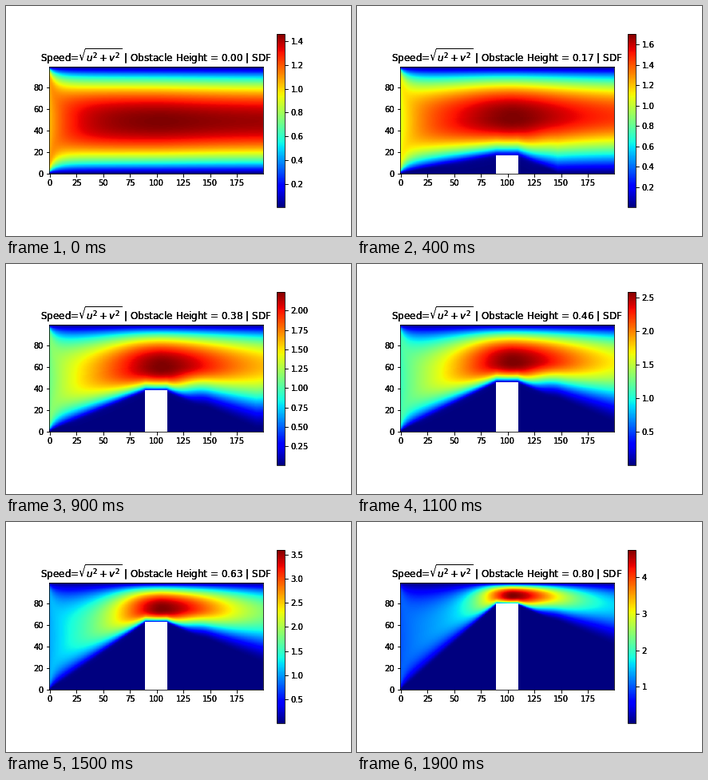
These frames come from a looping animation (432x288 px, 2000 ms). A matplotlib script:

```python
import numpy as np
import matplotlib.pyplot as plt
from matplotlib.animation import FuncAnimation

FRAMES = 20
LEFT, RIGHT, PEAK = 0.9, 1.1, 1.05   # obstacle sides, place of the top speed
heights = np.linspace(0, 0.8, FRAMES)

# peak speed by obstacle height
knots = [0, 0.168, 0.253, 0.379, 0.463, 0.632, 0.8]
peaks = [1.464, 1.705, 1.87, 2.245, 2.588, 3.607, 4.75]
vmax = 1 / np.interp(heights, knots, 1 / np.array(peaks))

xs, ys = np.linspace(0, 2, 200), np.linspace(0, 1, 100)
x, y = np.meshgrid(xs, ys)


def smooth(t):
    t = np.clip(t, 0, 1)
    return t * t * (3 - 2 * t)


def core_speed(h, top):
    """Speed along the middle of the jet."""
    base = 1.42 - 0.42 * np.exp(-x / 0.25)
    up = 0.5 * (1 - h ** 3)
    down = (0.45 + 0.5 * h) * (1 - h ** 3)
    reach = np.abs(x - PEAK) / np.where(x < PEAK, up, down)
    return base + (top - base) * np.exp(-0.693 * reach ** 1.7)


def speed(h, top):
    # middle line of the jet and upper edge of the slow wedges below it
    crest = 0.49 + 0.2 * h + 0.37 * h * h
    mid = 0.49 + (crest - 0.49) * smooth(x / LEFT)
    mid = mid - 0.25 * h ** 4 * np.clip(x - PEAK, 0, 1) ** 2
    edge = np.where(x < LEFT, h * x / LEFT,
                    h - 0.45 * np.clip(x - RIGHT, 0, 1))
    edge = np.maximum(edge, 0)

    power = 2 + 0.2 / (x + 0.01)
    above = np.clip((y - mid) / (1 - mid), 0, 1)
    below = np.clip((mid - y) / (mid - edge), 0, None)

    # flat-topped over the obstacle, bell-shaped in the wake
    blunt = 0.7 * min(1, 3 * h) * np.exp(-((x - 1) / 0.4) ** 2)
    flat = 1 - below ** np.minimum(power + blunt, 25)
    soft = 0.12 * np.clip(edge / 0.1, 0, 1)
    flat = (flat + np.hypot(flat, soft)) / 2
    bell = np.cos(np.pi / 2 * np.minimum(below, 1)) ** 2
    wake = smooth((x - RIGHT) / 0.4) * min(1, h / 0.38)
    lower = flat + (bell - flat) * wake

    shape = np.where(y > mid, 1 - above ** power, lower)
    # faster shoulders just behind the inlet
    side = np.minimum(np.maximum(above, below), 1)
    shoulder = 0.2 * np.exp(-x / 0.1) * (1 - np.exp(-x / 0.02))
    field = core_speed(h, top) * shape * (1 + shoulder * side ** 2)
    field[(x >= LEFT) & (x <= RIGHT) & (y < h)] = np.nan
    return field


def embolden(artist, times=3):
    plain = artist.draw
    artist.draw = lambda renderer: [plain(renderer) for _ in range(times)]


fields = [speed(h, top) for h, top in zip(heights, vmax)]

plt.rcParams["figure.subplot.bottom"] = 0.125
fig, ax = plt.subplots(figsize=(6, 4), dpi=72)
im = ax.imshow(fields[0], origin="lower", cmap="jet")
bar = fig.colorbar(im, ax=ax)
title = ax.set_title("")
for artist in (title, ax.xaxis, ax.yaxis, bar.ax.yaxis):
    embolden(artist)


def draw(k):
    im.set_data(fields[k])
    im.set_clim(0.003, vmax[k])
    title.set_text(r"Speed=$\sqrt{u^2+v^2}$ | Obstacle Height = "
                   f"{heights[k]:.2f} | SDF")
    return im, title


anim = FuncAnimation(fig, draw, frames=FRAMES, interval=100,
                     init_func=lambda: draw(0), repeat=True)
plt.show()
```
